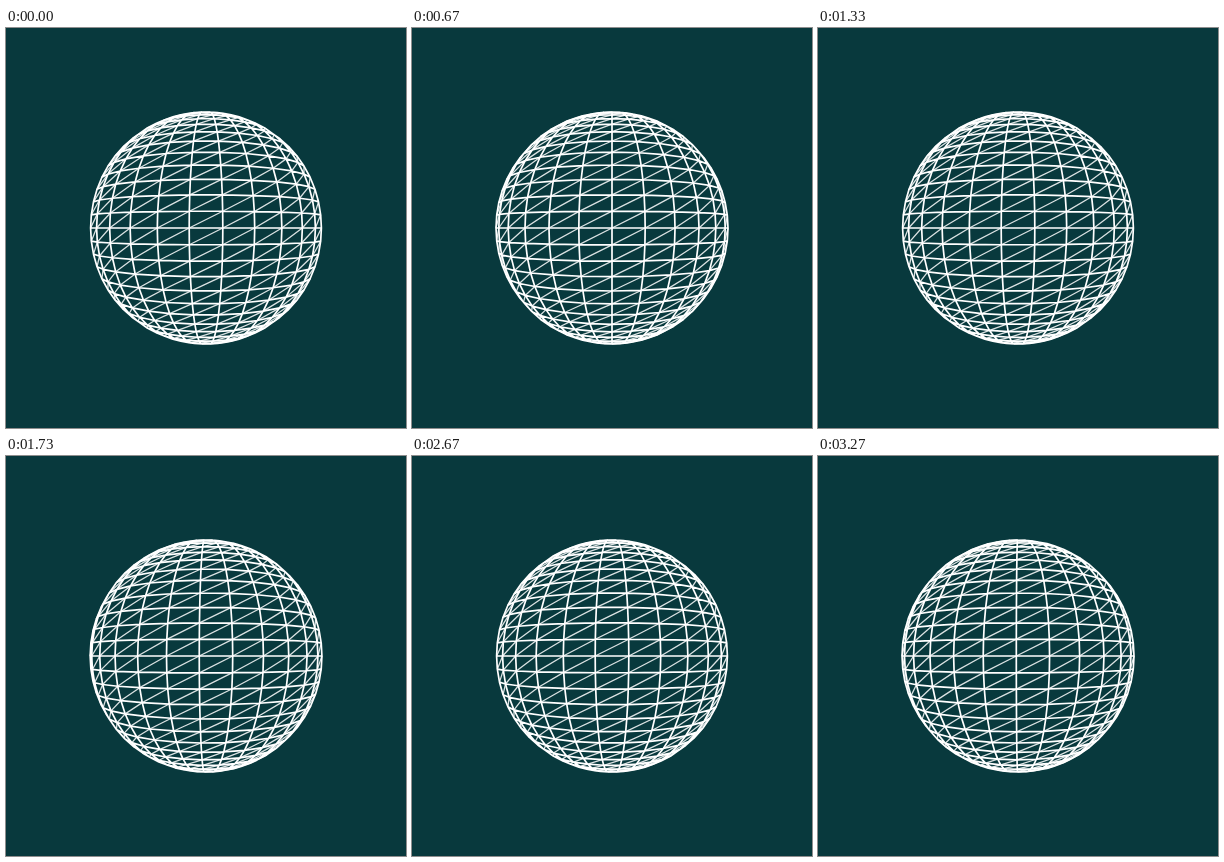
Recreate the animation shown at these times as an HTML page with a canvas. Size 400x400 px, loop 3310 ms.

```html
<!DOCTYPE html>
<html lang="en">
<head>
<meta charset="utf-8">
<title>Turning wireframe sphere</title>
<style>
html, body { margin: 0; height: 100%; overflow: hidden; background: #08393d; }
canvas { display: block; }
</style>
</head>
<body>
<canvas width="400" height="400"></canvas>
<script>
const ctx = document.querySelector('canvas').getContext('2d');
const LOOP = 3310, STEPS = 99;
const DETAIL = 30, RADIUS = 110;
const EYE = 200 / Math.tan(Math.PI / 6); // 60 degree field of view
const RAD = Math.PI / 180;

function project(row, col, turn) {
  const lat = row * 180 / DETAIL * RAD;
  const lon = ((col + 0.5) * 360 / DETAIL + turn) * RAD;
  const ring = RADIUS * Math.sin(lat);
  const scale = EYE / (EYE - ring * Math.cos(lon));
  return [
    200 + ring * Math.sin(lon) * scale,
    200 - RADIUS * Math.cos(lat) * scale
  ];
}

function strokePath(path, width, color) {
  ctx.lineWidth = width;
  ctx.strokeStyle = color;
  ctx.stroke(path);
}

function draw(turn) {
  const grid = new Path2D(), diagonals = new Path2D();
  for (let row = 0; row < DETAIL; row++) {
    for (let col = 0; col < DETAIL; col++) {
      const a = project(row, col, turn);
      const b = project(row, col + 1, turn);
      const c = project(row + 1, col + 1, turn);
      const d = project(row + 1, col, turn);
      const facing = (c[0] - a[0]) * (d[1] - b[1]) - (c[1] - a[1]) * (d[0] - b[0]);
      if (facing <= 0) continue;
      grid.moveTo(...a);
      for (const corner of [b, c, d, a]) grid.lineTo(...corner);
      diagonals.moveTo(...d);
      diagonals.lineTo(...b);
    }
  }
  ctx.fillStyle = '#08393d';
  ctx.fillRect(0, 0, 400, 400);
  ctx.lineJoin = 'round';
  strokePath(diagonals, 1.3, 'rgba(255, 255, 255, 0.85)');
  strokePath(grid, 1.7, '#fff');
}

// 30 steps a second, timed in hundredths
function tick() {
  const time = Math.floor(performance.now() % LOOP / 10) * 10;
  const step = Math.min(STEPS - 1, Math.floor((time + 5) * 0.03));
  draw(step * 0.3);
  requestAnimationFrame(tick);
}
tick();
</script>
</body>
</html>
```
